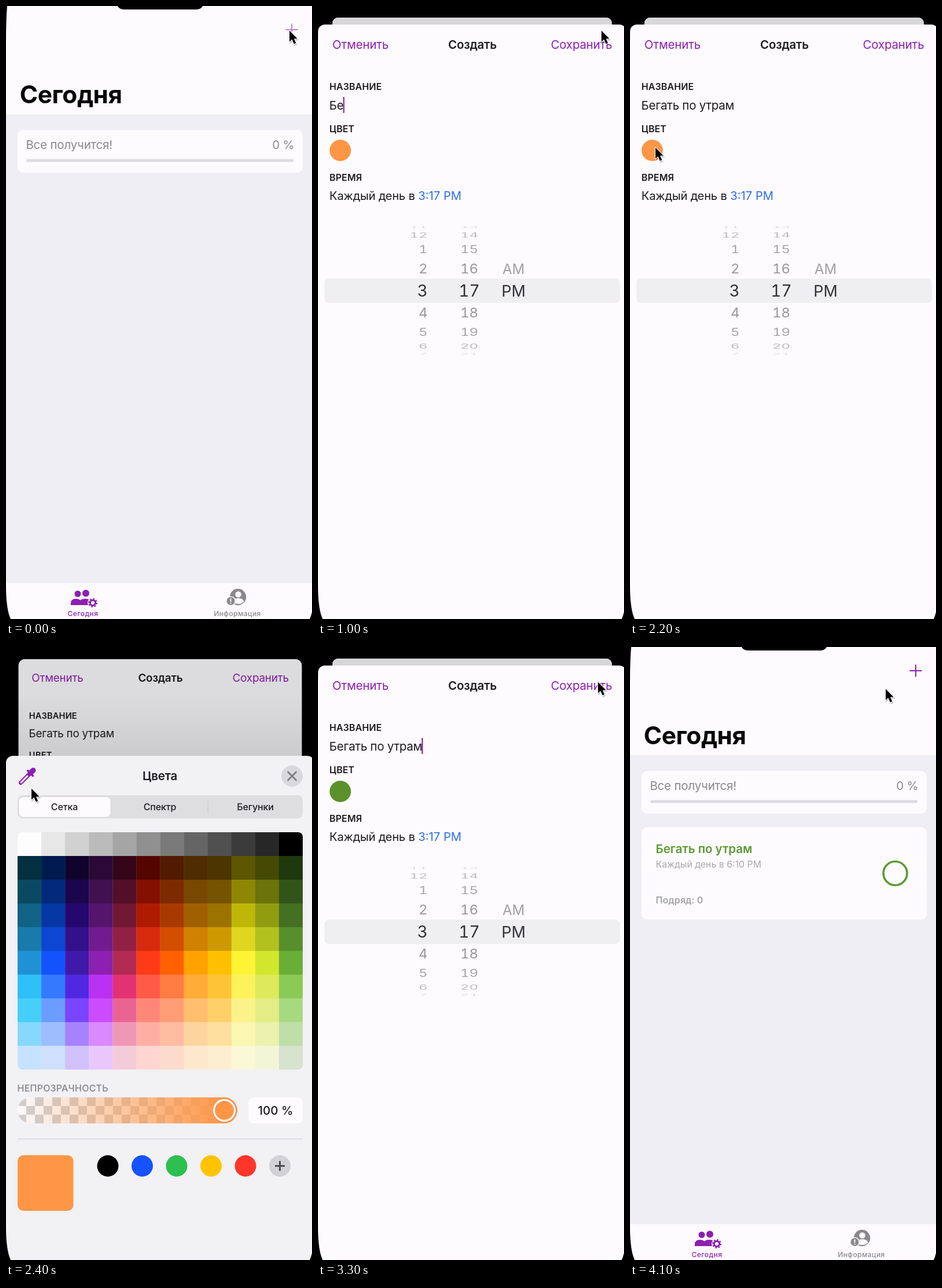
Animation of 529x1059 px, one loop 4200 ms. Source, as an HTML page:

```html
<!DOCTYPE html>
<html lang="ru">
<head>
<meta charset="utf-8">
<title>Привычки</title>
<style>
html, body { margin: 0; width: 100%; height: 100%; overflow: hidden; background: #000; }
svg { display: block; width: 100vw; height: 100vh; --pick: #ff9646; }
text { font-family: Inter, Roboto, sans-serif; white-space: pre; }
#wheels { font-variant-numeric: tabular-nums; }
.pick { fill: var(--pick); }
</style>
</head>
<body>
<svg id="stage" viewBox="0 0 529 1059"></svg>
<script>
const LOOP = 4200, STEP = 100;
const PAGE = 533, MID = PAGE / 2; // the phone screen runs slightly past the right edge
const PAPER = '#fdfbfe', INK = '#1c1b1f', PURPLE = '#8c1fb2', GREEN = '#5b912c', GRAY = '#89888c';
const TASK = 'Бегать по утрам';

// ---- markup helpers ----
const rect = (x, y, w, h, r, fill, more = '') =>
  `<rect x="${x}" y="${y}" width="${w}" height="${h}" rx="${r}" fill="${fill}" ${more}/>`;
const circle = (x, y, r, fill, more = '') =>
  `<circle cx="${x}" cy="${y}" r="${r}" fill="${fill}" ${more}/>`;
const line = (d, color, width, more = '') =>
  `<path d="${d}" fill="none" stroke="${color}" stroke-width="${width}" ${more}/>`;
const label = (x, y, str, { size = 20.5, weight = 400, fill = INK, anchor = 'start', gap = -.2, id = '' } = {}) =>
  `<text x="${x}" y="${y}" font-size="${size}" font-weight="${weight}" fill="${fill}"
    text-anchor="${anchor}" letter-spacing="${gap}" ${id && `id="${id}"`}>${str}</text>`;
const range = n => [...Array(n).keys()];

// ---- today screen ----
function peopleIcon() {
  const body = (x, w) => `<path d="M${x} 1035v-3q0-8 ${w / 2}-8t${w / 2} 8v3z" fill="${PURPLE}"/>`;
  return circle(124, 1015.5, 5.5, PURPLE) + body(112, 18) +
    circle(138, 1014.5, 6, PURPLE) + body(126.5, 21) +
    circle(150, 1031, 9, PAPER) +
    circle(150, 1031, 4.6, 'none', `stroke="${PURPLE}" stroke-width="3"`) +
    circle(150, 1031, 6.8, 'none', `stroke="${PURPLE}" stroke-width="2.4" stroke-dasharray="2.67"`);
}

function infoIcon() {
  return circle(401, 1021, 14.2, GRAY) + circle(401.5, 1016.5, 5.2, PAPER) +
    `<path d="M391.5 1029q2-6 10-6t10 6q-4 4-10 4t-10-4z" fill="${PAPER}"/>` +
    circle(388.5, 1028, 8.6, PAPER) + circle(388.5, 1028, 7, GRAY) +
    line('M388.5 1023.5v5.5m0 1.6v2', PAPER, 2);
}

function taskCard() {
  return `<g id="card">` + rect(20, 311, 493, 160, 10, PAPER) +
    label(44.5, 356, TASK, { weight: 600, fill: '#5b9a33', gap: -.05 }) +
    label(44.5, 381, 'Каждый день в 6:10 PM', { size: 15.9, fill: '#a9a8ac', gap: 0 }) +
    label(44.5, 443, 'Подряд: 0', { size: 16, weight: 600, fill: '#a3a2a6', gap: .1 }) +
    circle(458.5, 391, 20.5, 'none', 'stroke="#5b9a33" stroke-width="3.6"') + '</g>';
}

function todayScreen() {
  return `<g id="today" clip-path="url(#screen)">` +
    rect(0, 0, PAGE, 1059, 0, '#efeef4') + rect(0, 0, PAGE, 187, 0, PAPER) +
    `<path id="notch" d="M193 0q3 6 12 6h123q9 0 12-6z"/>` +
    line('M483.5 41h21M494 30.5v21', PURPLE, 2, 'id="plus"') +
    label(23.8, 167.5, 'Сегодня', { size: 42.4, weight: 700, fill: '#050505', gap: -.4 }) +
    rect(20, 214, 493, 74, 10, PAPER) +
    label(34.4, 247, 'Все получится!', { fill: GRAY }) +
    label(498.5, 247, '0 %', { fill: GRAY, anchor: 'end' }) +
    rect(35, 264.5, 462, 5, 2.5, '#dddbe0') + taskCard() +
    rect(0, 997, PAGE, 62, 0, PAPER) + peopleIcon() + infoIcon() +
    label(133, 1053.5, 'Сегодня', { size: 12, weight: 500, fill: PURPLE, anchor: 'middle', gap: .45 }) +
    label(400, 1053.5, 'Информация', { size: 12, weight: 500, fill: GRAY, anchor: 'middle', gap: .45 }) +
    rect(0, 0, PAGE, 1059, 0, '#000', 'id="todayDim"') + '</g>';
}

// ---- create sheet ----
function formSheet() {
  const head = (y, str) => label(19.8, y, str, { size: 16, weight: 600, gap: .1 });
  return `<g id="form">` + rect(0, 32, PAGE, 1100, 12, PAPER) +
    label(24.8, 74, 'Отменить', { fill: PURPLE }) +
    label(267, 74, 'Создать', { weight: 600, anchor: 'middle' }) +
    label(508.5, 74, 'Сохранить', { fill: PURPLE, anchor: 'end' }) +
    head(144.5, 'НАЗВАНИЕ') + label(19.6, 179, '', { gap: -.28, id: 'name' }) +
    rect(0, 157, 2.2, 28, 1, PURPLE, 'id="caret"') +
    head(218, 'ЦВЕТ') + circle(38.5, 249.5, 18.5, '', 'class="pick"') +
    head(302, 'ВРЕМЯ') + label(19.8, 335, 'Каждый день в', { size: 20.2, gap: -.18 }) +
    label(173.3, 335, '', { size: 20.2, fill: '#2f6dea', gap: 0, id: 'time' }) +
    rect(11, 471, 511, 42, 8, '#efeef0') + '<g id="wheels"></g>' +
    label(338, 462.5, 'AM', { size: 24, fill: '#a09fa3', anchor: 'middle', gap: 0 }) +
    label(338, 502, 'PM', { size: 27, fill: '#333236', anchor: 'middle', gap: 0 }) +
    rect(0, 32, PAGE, 1100, 12, '#000', 'id="formDim"') + '</g>';
}

// Rows of a picker sit on a cylinder, 20 degrees apart.
function wheel(value, x, anchor, format) {
  const base = Math.round(value);
  return range(9).map(i => {
    const d = base + i - 4 - value, angle = d * Math.PI / 9, flat = Math.cos(angle);
    if (flat < .1) return '';
    const on = Math.abs(d) < .5;
    return `<text transform="translate(${x} ${492 + 111 * Math.sin(angle)}) scale(1 ${flat})" dy=".363em"
      font-size="${on ? 28 : 24}" text-anchor="${anchor}" fill="${INK}"
      opacity="${on ? .9 : .47 * flat ** .7}">${format(base + i - 4)}</text>`;
  }).join('');
}
const hourText = h => (h + 23) % 12 + 1;
const minuteText = m => String((m + 60) % 60).padStart(2, '0');

// ---- colour sheet ----
// Six tones per column, dark to light; the rows between them are halfway mixes.
const TONES = `04303f 116284 2092d4 2fc0f8 46cff9 c5e3ff
001b50 0538a4 1353ff 3479fe 6a9dff cfdffc
10042f 25086d 3f1aa8 5028e2 7a45ff d2c0fb
2a0a35 55156d 8c20b0 b932f2 cc4bff e8c8fc
350619 711834 b02a53 e23273 ea6492 f4cbd9
550500 b01a00 ff3a17 ff5a48 ff877a ffd5d1
521a00 a83a00 ff6100 ff7c43 ff9d74 fcdbcd
4f2d00 a06000 ffa200 ffac38 ffbf6e fde8cd
4c3500 9c7200 ffc000 ffc338 ffd06a fdeed0
5c5600 bfb708 fdf436 fbf25c fbf38a fbf8d8
444a04 929c10 d2e62e dfe95c e4ec86 f2f6d6
20380d 456f22 6aae38 8bca56 a7d981 d7e2cf`.split('\n').map(row => row.split(' '));
const ROW_TONE = [0, .5, 1, 1.5, 2, 3, 4, 4.5, 5];

function cellColor(col, row) {
  if (!row) {
    const v = col === 11 ? 0 : Math.round(253 - 22.3 * col + .2 * col * (col - 1) / 2);
    return `rgb(${v},${v},${v})`;
  }
  const k = ROW_TONE[row - 1], tones = TONES[col];
  return `color-mix(in srgb, #${tones[Math.floor(k)]}, #${tones[Math.ceil(k)]})`;
}

function colorGrid() {
  const w = 493 / 12, h = 41;
  const cells = range(120).map(i => {
    const col = i % 12, row = Math.floor(i / 12);
    return rect(20 + col * w, 164 + row * h, w + .3, h + .3, 0, '', `style="fill:${cellColor(col, row)}"`);
  }).join('');
  return `<g clip-path="url(#gridClip)">${cells}</g>` +
    rect(472.5, 328.5, 40.5, 40.5, 1, 'none', 'id="chosen" stroke="#fff" stroke-width="3"');
}

function opacitySlider() {
  const size = 15;
  const checks = range(78).filter(i => (i % 26 + Math.floor(i / 26)) % 2 === 0).map(i =>
    rect(20 + i % 26 * size, 622 + Math.floor(i / 26) * size, size, size, 0, '#d0cfd2')).join('');
  return label(19.6, 612, 'НЕПРОЗРАЧНОСТЬ', { size: 16, weight: 500, fill: '#858489', gap: .2 }) +
    `<g clip-path="url(#slideClip)">${rect(20, 622, 380, 45, 0, '#fbfafc')}${checks}
      ${rect(20, 622, 380, 45, 0, 'url(#fade)')}</g>` +
    circle(377.5, 644.5, 20.5, '#0002') + circle(377.5, 644.5, 19.8, '#f4f3f5') +
    circle(377.5, 644.5, 16.3, '', 'class="pick"') +
    rect(419, 622, 94, 45, 9, PAPER) +
    label(466, 652, '100 %', { weight: 500, anchor: 'middle', gap: 0 });
}

function colorSheet() {
  const tab = (x, str) => label(x, 126, str, { size: 16, weight: 500, anchor: 'middle', gap: -.15 });
  const dots = ['#000', '#1453ff', '#2dbf4f', '#ffc300', '#ff3629', '#d2d1d5'];
  return `<g id="colors">` + rect(0, -78, PAGE, 122, 0, 'url(#shade)') +
    rect(0, 32, PAGE, 1100, 12, '#f2f1f4') +
    line('M25.5 78.5L41 63', PURPLE, 7, 'stroke-linecap="round"') +
    line('M26 78L37 67', '#f2f1f4', 3, 'stroke-linecap="round"') +
    line('M42 62L47 57', PURPLE, 9, 'stroke-linecap="round"') +
    line('M37.5 57.5L46.5 66.5', PURPLE, 3.5, 'stroke-linecap="round"') +
    label(266, 74, 'Цвета', { weight: 600, anchor: 'middle' }) +
    circle(494.5, 67, 18.5, '#d9d8dc') +
    line('M487.5 60l14 14m0-14l-14 14', '#7d7c81', 2.8, 'stroke-linecap="round"') +
    rect(20, 100, 493, 40, 9, '#dedde0') + rect(22, 103, 159, 35, 8, PAPER, 'stroke="#0001"') +
    line('M349 110v21', '#c9c8cc', 1) +
    tab(101, 'Сетка') + tab(266, 'Спектр') + tab(431, 'Бегунки') +
    colorGrid() + opacitySlider() + line('M20 694h493', '#d9d8dc', 1.5) +
    rect(20, 722, 96.5, 96, 10, '', 'class="pick"') +
    dots.map((c, i) => circle(176 + 59.5 * i, 740.5, 18.5, c)).join('') +
    line('M465 740.5h17m-8.5-8.5v17', '#4a494d', 3) + '</g>';
}

const ARROW = 'M0 0V20.5L4.7 16.2L8.3 24.6L12 23L8.4 14.8H14.6z';
const stage = document.getElementById('stage');
stage.innerHTML = `<defs>
  <clipPath id="screen">${rect(0, 0, PAGE, 1059, 0, '#000', 'id="screenRect"')}</clipPath>
  <clipPath id="gridClip">${rect(20, 164, 493, 410, 8, '#000')}</clipPath>
  <clipPath id="slideClip">${rect(20, 622, 380, 45, 22.5, '#000')}</clipPath>
  <linearGradient id="fade"><stop offset="0" style="stop-color:var(--pick);stop-opacity:0"/>
    <stop offset=".95" style="stop-color:var(--pick)"/></linearGradient>
  <linearGradient id="shade" x2="0" y2="1"><stop offset="0" stop-opacity="0"/>
    <stop offset="1" stop-opacity=".08"/></linearGradient>
</defs>` + rect(0, 0, PAGE, 1059, 0, '#000') + todayScreen() + formSheet() + colorSheet() +
  `<path d="M0 1000Q0 1042 8 1059H0zM533 1000Q533 1042 525 1059H533zM0 0H2Q0 25 0 70z"/>
  <g id="cursor" stroke-linejoin="round">
    <path d="${ARROW}" transform="translate(2 4.5) scale(.94)" fill="#0003" stroke="#0002" stroke-width="3"/>
    <path d="${ARROW}" transform="translate(1 2.5) scale(.94)" stroke="#fff" stroke-width="2.4" paint-order="stroke"/>
  </g>`;
const el = Object.fromEntries([...stage.querySelectorAll('[id]')].map(e => [e.id, e]));

// ---- timeline ----
const FORM_Y = [[50, 1030], [300, 0], [3750, 0], [4050, 1030]];
const COLORS_Y = [[2200, 1030], [2400, 156], [2500, 156], [2650, 0], [2900, 0], [3200, 1030]];
const HOUR = [[3350, 3], [3500, 6]];
const MINUTE = [[3500, 17], [3650, 10]];
const CURSOR = [[0, 489, 40], [1000, 489, 40], [1200, 440, 440], [1800, 400, 430], [2100, 43, 242],
  [2400, 43, 242], [2500, 300, 215], [2600, 420, 250], [2700, 490, 346], [2800, 483, 58],
  [3300, 483, 58], [3400, 180, 500], [3500, 182, 440], [3600, 262, 520], [3700, 455, 66],
  [3900, 455, 66], [4100, 441, 70]];

const mix = (a, b, u) => a + (b - a) * u;
const clamp = v => Math.max(0, Math.min(1, v));
const show = (node, on) => node.setAttribute('visibility', on ? 'visible' : 'hidden');

function follow(keys, t) {
  const next = keys.findIndex(k => k[0] > t);
  if (next < 0) return keys.at(-1).slice(1);
  if (!next) return keys[0].slice(1);
  const [a, b] = [keys[next - 1], keys[next]];
  const u = (t - a[0]) / (b[0] - a[0]), eased = u * (2 - u);
  return a.slice(1).map((v, i) => mix(v, b[i + 1], eased));
}

function draw(t) {
  const [formY] = follow(FORM_Y, t), [colorsY] = follow(COLORS_Y, t);
  const shown = 1 - formY / 1030;
  const half = clamp((1030 - colorsY) / 874), full = clamp((156 - colorsY) / 156);

  const s = mix(1, .907, shown);
  el.today.setAttribute('transform', `translate(${MID * (1 - s)} ${20 * shown}) scale(${s})`);
  el.today.setAttribute('opacity', 1 - half);
  el.todayDim.setAttribute('opacity', .15 * shown);
  el.screenRect.setAttribute('rx', 11 * shown);
  show(el.notch, !shown);
  el.plus.setAttribute('opacity', t < 100 ? .55 : 1);
  show(el.card, t >= 3700);

  const f = 1 - .081 * half - .012 * full;
  el.form.setAttribute('transform',
    `translate(${MID * (1 - f)} ${formY + 32 * (1 - f) - 11 * half - full}) scale(${f})`);
  el.formDim.setAttribute('opacity', .13 * half);
  el.colors.setAttribute('transform', `translate(0 ${colorsY})`);
  show(el.colors, colorsY < 1030);

  const picked = t >= 2700;
  stage.style.setProperty('--pick', picked ? GREEN : '#ff9646');
  el.chosen.setAttribute('opacity', +picked);

  const typed = t < 900 ? 0 : Math.floor(2 + (t - 1000) / 62);
  el.name.textContent = TASK.slice(0, Math.max(0, typed));
  show(el.caret, t >= 300 && t < 2000 || t >= 3200 && t < 3400);
  el.caret.setAttribute('x', 18.8 + el.name.getComputedTextLength());

  const [hour] = follow(HOUR, t), [minute] = follow(MINUTE, t);
  el.time.textContent = `${hourText(Math.round(hour))}:${minuteText(Math.round(minute))} PM`;
  el.wheels.innerHTML = wheel(hour, 189.5, 'end', hourText) + wheel(minute, 261.5, 'middle', minuteText);

  el.cursor.setAttribute('transform', `translate(${follow(CURSOR, t).join(' ')})`);
}

const start = performance.now();
function tick() {
  const t = (performance.now() - start) % LOOP;
  draw(Math.floor(t / STEP) * STEP);
  requestAnimationFrame(tick);
}
tick();
</script>
</body>
</html>
```
